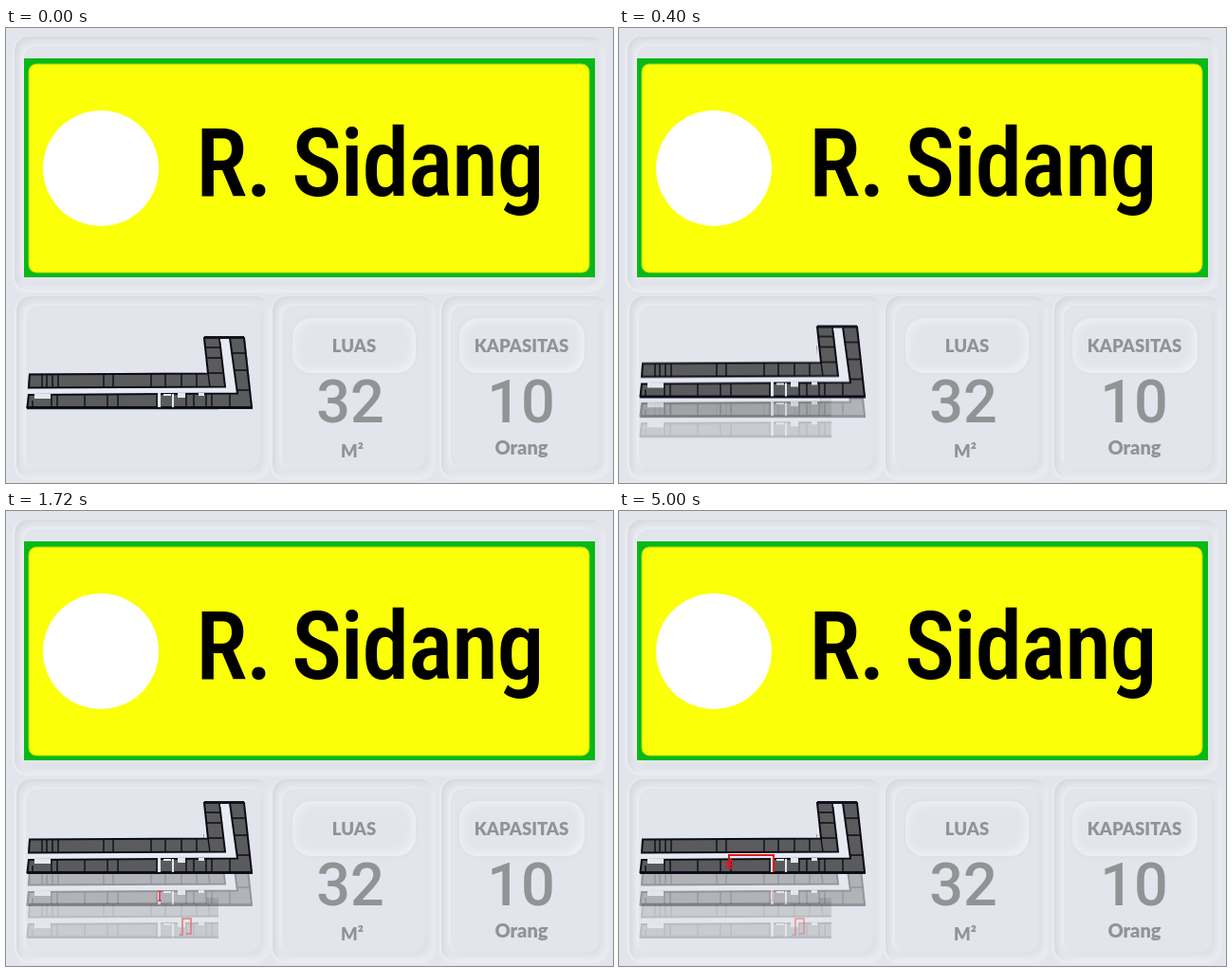
These frames come from a looping animation (640x480 px, 5.12 s). An HTML page:

```html
<!DOCTYPE html>
<html lang="id">
<head>
<meta charset="utf-8">
<title>R. Sidang</title>
<style>
html, body { margin: 0; width: 100%; height: 100%; overflow: hidden; background: #e2e5eb; }
#stage { position: relative; width: 640px; height: 480px; overflow: hidden; background: #e2e5eb; }
.panel, .pill { position: absolute; box-sizing: border-box; }
.panel {
  border-radius: 15px; background: #e2e5eb;
  box-shadow: inset 3px 3px 4px #d7dae0, inset -3px -3px 4px #eaecf1, -1px 1px 3px 1px #eceef3;
}
.panel::after {
  content: ""; position: absolute; inset: 10px; border-radius: 12px;
  box-shadow: -2px -1px 4px #eef0f4, 2px 2px 4px #dadde3;
}
.pill {
  top: 306px; height: 58px; border-radius: 20px; background: #e2e5eb;
  box-shadow: inset 4px 4px 8px #eceef3, inset -4px -4px 8px #eff1f5, 0 0 4px #d8dbe1;
}
svg { position: absolute; left: 0; top: 0; }
.title { font-family: "Roboto Condensed", Roboto, sans-serif; font-weight: 500; font-stretch: condensed; font-size: 103px; letter-spacing: -.015em; }
.label { font: 900 18.5px Lato, sans-serif; text-anchor: middle; fill: #929395; }
.count { font: 500 63px Roboto, sans-serif; text-anchor: middle; fill: #929395; }

/* Floors spread apart during the first second */
.floor { animation: spread 5.12s infinite; }
.top { --from: 19px; --to: 0px; }
.mid { --from: 19px; --to: 34px; opacity: .36; }
.low { --from: 20px; --to: 68px; opacity: .19; }
@keyframes spread {
  0% { transform: translateY(var(--from)); animation-timing-function: cubic-bezier(.39, .575, .565, 1); }
  19.53%, 100% { transform: translateY(var(--to)); }
}

.route { fill: none; stroke: #e0161e; stroke-width: 2; stroke-dasharray: 1 2; }
.exit { stroke: #e2777c; stroke-width: 1.6; animation: exit 5.12s linear infinite; }
@keyframes exit {
  0%, 13.2% { stroke-dashoffset: 1.02; opacity: 1; }
  19.53%, 56.25% { stroke-dashoffset: 0; opacity: 1; }
  66.4%, 100% { stroke-dashoffset: 0; opacity: .7; }
}
.lift { fill: none; stroke: #e0343c; stroke-width: 1.6; animation: lift 5.12s linear infinite; }
@keyframes lift {
  0%, 33.58% { opacity: 0; }
  33.59%, 36% { opacity: 1; }
  43.75%, 100% { opacity: .3; }
}
.hall { animation: hall 5.12s linear infinite; }
@keyframes hall {
  0%, 36% { stroke-dashoffset: 1.02; }
  50%, 100% { stroke-dashoffset: 0; }
}
</style>
</head>
<body>
<div id="stage">
  <div class="panel" style="left:9px;top:9px;width:622px;height:268px"></div>
  <div class="panel" style="left:11px;top:283px;width:267px;height:192px"></div>
  <div class="panel" style="left:281px;top:283px;width:171px;height:192px"></div>
  <div class="panel" style="left:459px;top:283px;width:176px;height:192px"></div>
  <div class="pill" style="left:302px;width:130px"></div>
  <div class="pill" style="left:478px;width:132px"></div>

  <svg width="640" height="480" viewBox="0 0 640 480">
    <defs>
      <clipPath id="bar"><path d="M0 340H224V390H0Z"/></clipPath>
      <g id="plan">
        <path fill="#e8eaf3" d="M25 346H209V307H251L260 381H22Z"/>
        <path fill="#101228" d="M22 379H260V383H22Z"/>
        <g fill="#5b5b5d" stroke="#0a0b14" stroke-width="2">
          <path d="M25 346.500L213 345.500L209 308H225L231 359.500L24 360.500Z"/>
          <path d="M24 368L244 366.500L236 308H251L259 381H22.500Z"/>
        </g>
        <g fill="none" stroke="#0c0d16" stroke-width="1.4">
          <path d="M38 346v14M43 346v14M49 346v14M55 346v14M103 346v14M113 346v14M153 346v14M168 346v14M185 346v14M201 346v14M213 345l2 15M211 318h15M212 329h16M213 345h16"/>
          <path d="M28 374v7M48 368v13M54 368v13M83 368v13M107 368v13M118 368v13M159 367v14M190 367v14M198 367v14M211 367v14M217 367v14M236 367v14M238 324h14M240 342h15M243 363h14"/>
        </g>
        <path fill="#e6e8f0" d="M30 367H47V372H30ZM160 366H163V381H160ZM166 367H174V369H166ZM175 367H177V381H175ZM181 366H189V371H181ZM203 366H209V369H203ZM226 309H235V312H226Z"/>
        <path fill="#11131f" d="M209 306H251V309H209Z"/>
      </g>
    </defs>

    <path fill="#08b818" d="M19 32H621V263H19Z"/>
    <rect x="24" y="38" width="591" height="220" rx="8" fill="#fbff08" stroke="#a5dd0c"/>
    <circle cx="100" cy="148" r="61" fill="#fff"/>
    <text id="title" class="title" x="200" y="176.500">R. Sidang</text>

    <g class="label">
      <text x="367" y="341.500">LUAS</text>
      <text x="543.500" y="341.500">KAPASITAS</text>
      <text x="365" y="452.500">M²</text>
      <text x="543.500" y="450" font-size="20">Orang</text>
    </g>
    <g class="count">
      <text x="363" y="416">32</text>
      <text x="543" y="416">10</text>
    </g>

    <g class="floor low"><use href="#plan" clip-path="url(#bar)"/></g>
    <path class="route exit" pathLength="1" d="M183 447H186V430H195V446H190"/>
    <g class="floor mid"><use href="#plan"/></g>
    <path class="lift" d="M160 401H164M162 401V411M160 411H164"/>
    <g class="floor top"><use href="#plan"/></g>
    <path class="route hall" pathLength="1" d="M163 381V363H116V367L119 369L114 371L119 373L114 375L119 377"/>
  </svg>
</div>
<script>
// Set the heading to the width of its sign
const title = document.getElementById("title");
const size = Math.min(106, 103 * 366 / title.getComputedTextLength());
title.style.fontSize = size + "px";
</script>
</body>
</html>
```
